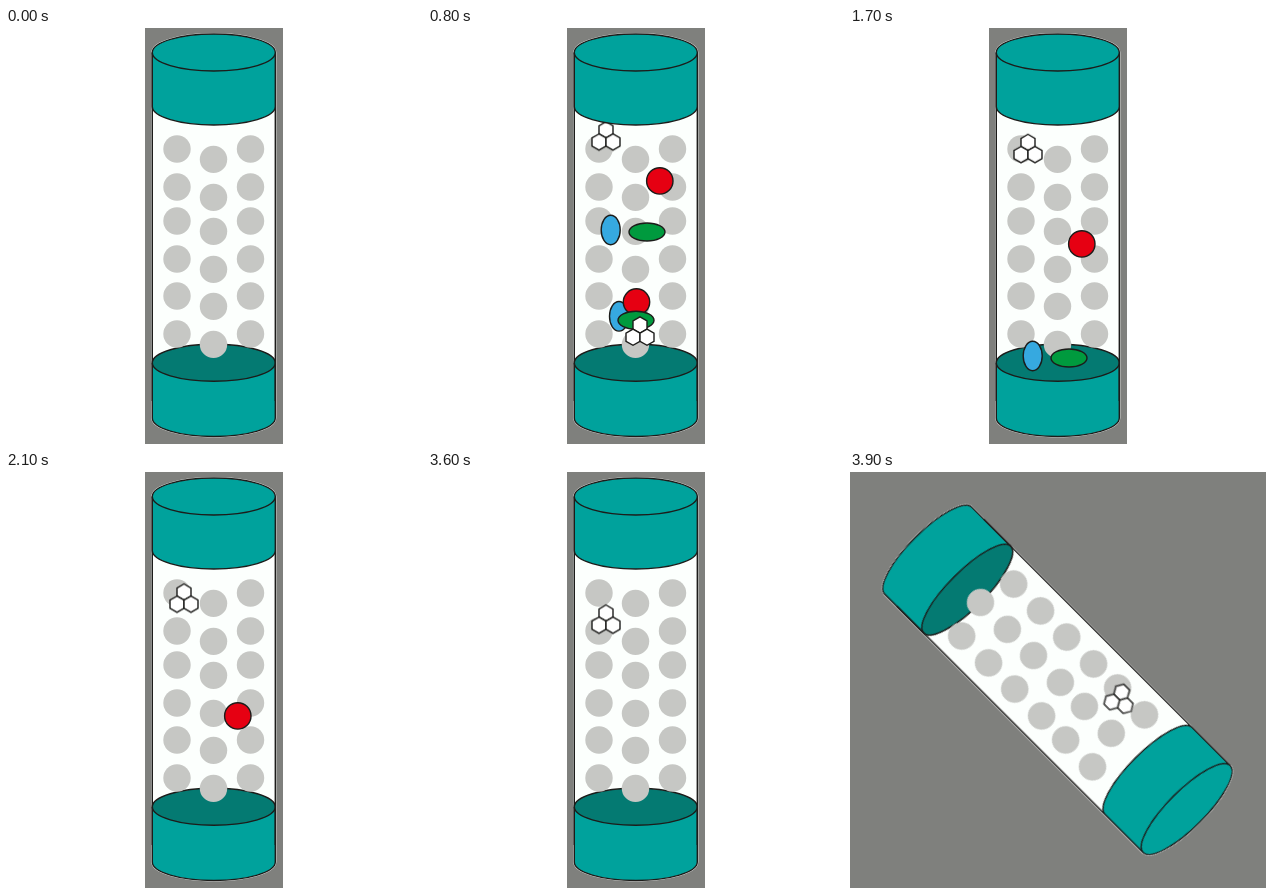
An HTML page for the animation above (4 s loop, 416 by 416 pixels).

```html
<!DOCTYPE html>
<html lang="en">
<head>
<meta charset="utf-8">
<title>Column separation</title>
<style>
  html, body { margin: 0; width: 100%; height: 100%; overflow: hidden; background: #fff; }
  svg { display: block; width: 100vw; height: 100vh; }
  .line { stroke: #1c1c1a; stroke-width: 1.4; }
  .cap { fill: #00a29c; }
  .red { fill: #e60012; }
  .blue { fill: #36a9e0; }
  .green { fill: #009a3e; }
  .hex { fill: #fff; }

  .column { transform-origin: 207.5px 207.5px; animation: turn 4s step-end infinite; }
  .backdrop { animation: backdrop 4s step-end infinite; }
  .fall { animation: fall 4s infinite; }
  .all { animation: all 4s step-end infinite; }
  .fast { animation: fast 4s step-end infinite; }
  .medium { animation: medium 4s step-end infinite; }
  .mix { animation: mix 4s step-end infinite; }

  @keyframes turn {
    0% { transform: rotate(0deg); }
    92.5% { transform: rotate(45deg); }
    95% { transform: rotate(90deg); }
    97.5%, 100% { transform: rotate(135deg); }
  }
  @keyframes backdrop { 0% { opacity: 0; } 92.5%, 100% { opacity: 1; } }
  @keyframes fall {
    0% { transform: translateY(0); animation-timing-function: steps(36, end); }
    90%, 100% { transform: translateY(var(--drop)); }
  }
  @keyframes all { 0% { opacity: 0; } 2.5%, 100% { opacity: 1; } }
  @keyframes fast { 0% { opacity: 0; } 2.5% { opacity: 1; } 47.5%, 100% { opacity: 0; } }
  @keyframes medium { 0% { opacity: 0; } 2.5% { opacity: 1; } 90%, 100% { opacity: 0; } }
  @keyframes mix { 0% { opacity: 0; } 2.5% { opacity: 1; } 25%, 100% { opacity: 0; } }
</style>
</head>
<body>
<svg viewBox="0 0 416 416">
  <defs>
    <path id="cell" class="hex line" d="M0-8.1 7-4.05V4.05L0 8.1-7 4.05V-4.05Z"/>
    <g id="rings">
      <use href="#cell" y="-12.2"/>
      <use href="#cell" x="-7"/>
      <use href="#cell" x="7"/>
    </g>
    <circle id="red" class="red line" r="13.2"/>
    <ellipse id="blue" class="blue line" rx="9.5" ry="14.8"/>
    <ellipse id="green" class="green line" rx="18" ry="9"/>
    <g id="beads" fill="#c6c7c4"></g>
    <clipPath id="inside"><path d="M146 0H270V335A61.6 18.5 0 0 1 146 335Z"/></clipPath>
  </defs>

  <rect x="139" width="138" height="416" fill="#7f807d"/>
  <rect class="backdrop" width="416" height="416" fill="#7f807d"/>

  <g class="column">
    <path d="M146.3 24.5A61.5 18.5 0 0 1 269.3 24.5V390A61.5 18.5 0 0 1 146.3 390Z"
          fill="#fcfffd" stroke="#fff" stroke-width="2"/>
    <path class="cap line" d="M146.3 335V390A61.5 18.5 0 0 0 269.3 390V335"/>
    <ellipse class="line" cx="207.8" cy="334.8" rx="61.5" ry="18.5" fill="#047a72"/>
    <use href="#beads"/>

    <g clip-path="url(#inside)">
      <g class="mix">
        <use href="#blue" x="191" y="288.3"/>
        <use href="#red" x="208.5" y="274"/>
        <use href="#green" x="208" y="292.3"/>
        <use href="#rings" x="212" y="309.2"/>
      </g>
      <g class="fast">
        <g class="fall" style="--drop: 504px">
          <use href="#blue" x="182.7" y="90"/>
          <use href="#green" x="219" y="92"/>
        </g>
      </g>
      <g class="medium">
        <g class="fall" style="--drop: 252px"><use href="#red" x="231.8" y="96.9"/></g>
      </g>
      <g class="all">
        <g class="fall" style="--drop: 50.4px"><use href="#rings" x="178" y="102.8"/></g>
      </g>
    </g>

    <path class="line" d="M146.3 24.5V373M269.3 24.5V373" fill="none"/>
    <path class="cap line" d="M146.3 24.5V78.5A61.5 18.5 0 0 0 269.3 78.5V24.5"/>
    <ellipse class="cap line" cx="207.8" cy="24.5" rx="61.5" ry="18.5"/>
  </g>
</svg>
<script>
  const beads = document.getElementById('beads');
  const rows = [121, 159, 193, 231, 268, 306];
  const columns = [[171, 0], [207.5, 10.4], [244.5, 0]];
  for (const [x, shift] of columns) {
    for (const y of rows) {
      const bead = document.createElementNS('http://www.w3.org/2000/svg', 'circle');
      bead.setAttribute('cx', x);
      bead.setAttribute('cy', y + shift);
      bead.setAttribute('r', 13.7);
      beads.append(bead);
    }
  }
</script>
</body>
</html>
```
